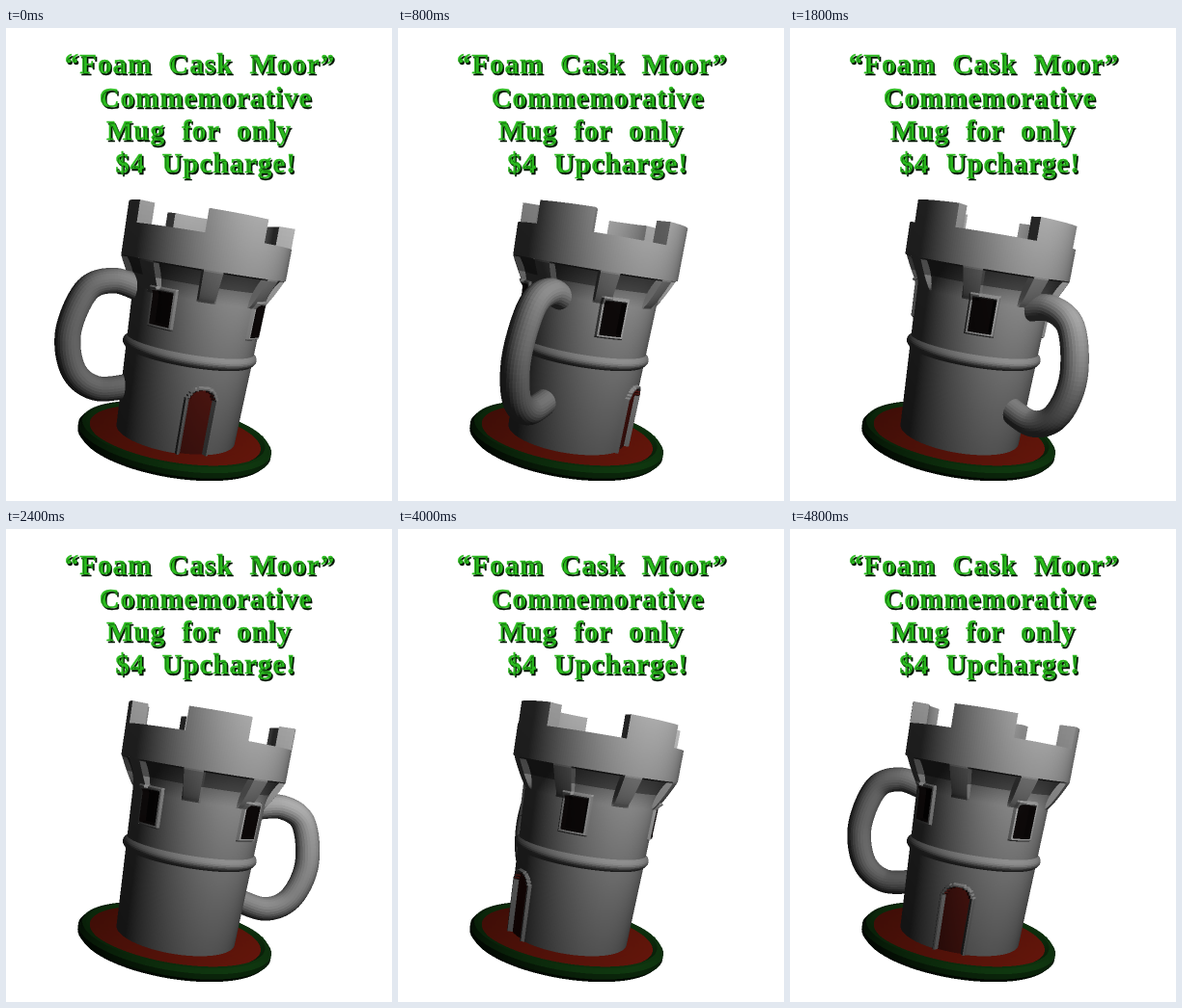
Recreate the animation shown at these times as an HTML page with a canvas. Size 400 by 491 pixels, loop 5000 ms.

```html
<!DOCTYPE html>
<html lang="en">
<head>
<meta charset="utf-8">
<title>Commemorative mug</title>
<style>
html, body { margin: 0; width: 100%; height: 100%; overflow: hidden; background: #fff; }
#stage { position: relative; width: 400px; height: 491px; overflow: hidden; }
canvas, svg { position: absolute; left: 0; top: 0; width: 400px; height: 491px; }
text {
  font: bold 29px "Liberation Serif", "Noto Serif", serif;
  text-anchor: middle;
  letter-spacing: 1px;
  word-spacing: 9px;
  fill: #2abb1e;
  stroke: #2abb1e;
  stroke-width: .4px;
  text-shadow: 1.5px 1.5px 0 #031503;
}
</style>
</head>
<body>
<div id="stage">
  <canvas id="mug" width="800" height="982"></canvas>
  <svg viewBox="0 0 400 491">
    <text x="201" y="47">“Foam Cask Moor”</text>
    <text x="207" y="82">Commemorative</text>
    <text x="200" y="116">Mug for only</text>
    <text x="207" y="150">$4 Upcharge!</text>
  </svg>
</div>
<script>
const STEP_MS = 200, STEPS = 25, TURN = 12;
const SCALE = 2;
const RAD = Math.PI / 180;
const W = 400 * SCALE, H = 491 * SCALE;
const ctx = document.getElementById('mug').getContext('2d');
const image = ctx.createImageData(W, H);
const pixels = new Uint32Array(image.data.buffer);
const depth = new Float32Array(W * H);

// Camera: distance, downward pitch, roll and the point it looks at.
const DIST = 580, MID = 115, CX = 192.8, CY = 319.5;
const SP = Math.sin(8.3 * RAD), CP = Math.cos(8.3 * RAD);
const SR = Math.sin(9.5 * RAD), CR = Math.cos(9.5 * RAD);
const LIGHT = [150, 180, 330];
const DOOR = 17;

const STONE = [136, 136, 136], FRAME = [165, 165, 165], SHADE = [84, 84, 84];
const HOLE = [14, 10, 10], WOOD = [98, 28, 22], RIM = [18, 64, 18], MOAT = [128, 28, 14];

const patches = [];

// A grid of quads; paint returns null where a quad is left out.
function patch(nu, nv, point, paint) {
  const verts = [], colors = [];
  for (let j = 0; j <= nv; j++)
    for (let i = 0; i <= nu; i++) verts.push(point(i / nu, j / nv));
  for (let j = 0; j < nv; j++)
    for (let i = 0; i < nu; i++) colors.push(paint((i + .5) / nu, (j + .5) / nv));
  patches.push({ nu, nv, verts, colors, view: verts.map(() => [0, 0, 0, 0, 0]) });
}

const polar = (r, deg, y) => [r * Math.sin(deg * RAD), y, r * Math.cos(deg * RAD)];
const wrap = (a, period) => a - period * Math.round(a / period);
const clamp = v => Math.max(0, Math.min(1, v));

function inWindow(a, y, w, h) {
  return Math.abs(wrap(a - 45, 90)) * 67 * RAD < w && Math.abs(y - 144) < h;
}

function inDoor(a, y, w) {
  const x = wrap(a, 360) * 64 * RAD;
  return y < 62 ? Math.abs(x) < w : x * x + (y - 62) ** 2 < w * w;
}

const isCorbel = a => Math.abs(wrap(a - 34, 45)) < 7;
const isGap = (a, y) => y > 218 && Math.abs(wrap(a, 90)) > 19.5;

function wallRadius(a, y) {
  if (y >= 186.5) return 84;
  let r = 63 + y * .03 + 4 * Math.max(0, 1 - ((y - 101) / 6) ** 2);
  const t = clamp((y - 157) / 30);
  r += isCorbel(a) ? 16 * t ** .8 : 11 * t * t;
  if (inWindow(a, y, 10, 16)) return r - 4;
  if (inWindow(a, y, 12.5, 19)) return r + 2.5;
  if (inDoor(a, y, 12.5)) return r - 2;
  if (inDoor(a, y, 16)) return r + 3;
  return r;
}

function wallColor(a, y) {
  if (isGap(a, y)) return null;
  if (inWindow(a, y, 10, 16)) return HOLE;
  if (inWindow(a, y, 12.5, 19)) return FRAME;
  if (inDoor(a, y, 12.5)) return WOOD;
  if (y > 172 && y < 186 && !isCorbel(a)) return SHADE;
  return STONE;
}

// Straight segments through points
function along(points, t) {
  const s = t * (points.length - 1), i = Math.min(points.length - 2, Math.floor(s)), f = s - i;
  return points[i].map((v, k) => v + (points[i + 1][k] - v) * f);
}

// Smooth curve through points
function curve(points, t) {
  const s = t * (points.length - 1), i = Math.min(points.length - 2, Math.floor(s)), f = s - i;
  const at = n => points[Math.max(0, Math.min(points.length - 1, n))];
  return [0, 1].map(k => {
    const a = at(i - 1)[k], b = at(i)[k], c = at(i + 1)[k], d = at(i + 2)[k];
    return b + .5 * f * (c - a + f * (2 * a - 5 * b + 4 * c - d + f * (3 * (b - c) + d - a)));
  });
}

function buildWall() {
  const yAt = v => 2 + 237 * v;
  patch(240, 158,
    (u, v) => polar(wallRadius(u * 360, yAt(v)), u * 360, yAt(v)),
    (u, v) => wallColor(u * 360, yAt(v)));
  const innerY = v => 194 + 45 * v;
  patch(240, 15,
    (u, v) => polar(68, u * 360, innerY(v)),
    (u, v) => isGap(u * 360, innerY(v)) ? null : STONE);
  for (let k = 0; k < 4; k++)
    for (const edge of [-19.5, 19.5])
      patch(4, 5, (u, v) => polar(68 + 16 * u, 90 * k + edge, 218 + 21 * v), () => STONE);
}

function buildBase() {
  const profile = [[50, 10], [72, 10], [91, 10], [95, 13], [99, 13], [102.5, 9], [102.5, 4], [99, 0]];
  patch(140, 28,
    (u, v) => { const [r, y] = along(profile, v); return polar(r, u * 360, y); },
    (u, v) => v < 2 / 7 ? MOAT : RIM);
}

function buildHandle() {
  const path = [[60, 155], [88, 160], [113, 147], [125, 104], [115, 66], [90, 50], [56, 56]];
  const tube = 12.5;
  patch(70, 28, (u, v) => {
    const [r, y] = curve(path, u);
    const p = curve(path, Math.max(0, u - .01)), q = curve(path, Math.min(1, u + .01));
    const len = Math.hypot(q[0] - p[0], q[1] - p[1]);
    const side = tube * Math.cos(v * 2 * Math.PI);
    return [
      -(r - side * (q[1] - p[1]) / len),
      y + side * (q[0] - p[0]) / len,
      tube * Math.sin(v * 2 * Math.PI)
    ];
  }, () => STONE);
}

function project(p, out, sin, cos) {
  const x = p[0] * cos + p[2] * sin, z = p[2] * cos - p[0] * sin, y = p[1] - MID;
  const vy = y * CP - z * SP, vz = z * CP + y * SP, s = DIST / (DIST - vz);
  out[0] = x;
  out[1] = vy;
  out[2] = vz;
  out[3] = SCALE * (CX + s * (x * CR + vy * SR));
  out[4] = SCALE * (CY + s * (x * SR - vy * CR));
}

function shade(a, b, c, d, color) {
  const ux = c[0] - a[0], uy = c[1] - a[1], uz = c[2] - a[2];
  const wx = d[0] - b[0], wy = d[1] - b[1], wz = d[2] - b[2];
  const nx = uy * wz - uz * wy, ny = uz * wx - ux * wz, nz = ux * wy - uy * wx;
  const n = Math.hypot(nx, ny, nz) || 1;
  const x = (a[0] + c[0]) / 2, y = (a[1] + c[1]) / 2, z = (a[2] + c[2]) / 2;
  const face = -nx * x - ny * y + nz * (DIST - z) < 0 ? -1 : 1;
  const lx = LIGHT[0] - x, ly = LIGHT[1] - y, lz = LIGHT[2] - z;
  const dot = face * (nx * lx + ny * ly + nz * lz) / (n * Math.hypot(lx, ly, lz));
  const k = (.21 + .86 * Math.max(0, dot)) * (.97 + .0014 * x + .0019 * y);
  const ch = v => Math.max(0, Math.min(255, Math.round(v * k)));
  return (255 << 24 | ch(color[2]) << 16 | ch(color[1]) << 8 | ch(color[0])) >>> 0;
}

function triangle(a, b, c, rgba) {
  const ax = a[3], ay = a[4], bx = b[3], by = b[4], cx = c[3], cy = c[4];
  const area = (bx - ax) * (cy - ay) - (by - ay) * (cx - ax);
  if (Math.abs(area) < 1e-6) return;
  const x0 = Math.max(0, Math.ceil(Math.min(ax, bx, cx) - .5));
  const x1 = Math.min(W - 1, Math.floor(Math.max(ax, bx, cx) - .5));
  const y0 = Math.max(0, Math.ceil(Math.min(ay, by, cy) - .5));
  const y1 = Math.min(H - 1, Math.floor(Math.max(ay, by, cy) - .5));
  for (let y = y0; y <= y1; y++) {
    for (let x = x0; x <= x1; x++) {
      const px = x + .5, py = y + .5;
      const wa = ((bx - px) * (cy - py) - (by - py) * (cx - px)) / area;
      const wb = ((cx - px) * (ay - py) - (cy - py) * (ax - px)) / area;
      const wc = 1 - wa - wb;
      if (wa < -1e-6 || wb < -1e-6 || wc < -1e-6) continue;
      const z = wa * a[2] + wb * b[2] + wc * c[2], i = y * W + x;
      if (z > depth[i]) {
        depth[i] = z;
        pixels[i] = rgba;
      }
    }
  }
}

function draw(angle) {
  const sin = Math.sin(angle * RAD), cos = Math.cos(angle * RAD);
  pixels.fill(0);
  depth.fill(-1e9);
  for (const { nu, nv, verts, colors, view } of patches) {
    verts.forEach((p, i) => project(p, view[i], sin, cos));
    for (let j = 0; j < nv; j++) {
      for (let i = 0; i < nu; i++) {
        const color = colors[j * nu + i];
        if (!color) continue;
        const k = j * (nu + 1) + i;
        const a = view[k], b = view[k + 1], c = view[k + nu + 2], d = view[k + nu + 1];
        const rgba = shade(a, b, c, d, color);
        triangle(a, b, c, rgba);
        triangle(a, c, d, rgba);
      }
    }
  }
  ctx.putImageData(image, 0, 0);
}

// Thirty poses per turn; every sixth one is skipped.
const pose = step => step + Math.floor(step / 5);

let shown = -1;
function tick() {
  const step = Math.floor(performance.now() / STEP_MS) % STEPS;
  if (step !== shown) {
    shown = step;
    draw(DOOR + pose(step) * TURN);
  }
  requestAnimationFrame(tick);
}

buildWall();
buildBase();
buildHandle();
tick();
</script>
</body>
</html>
```
